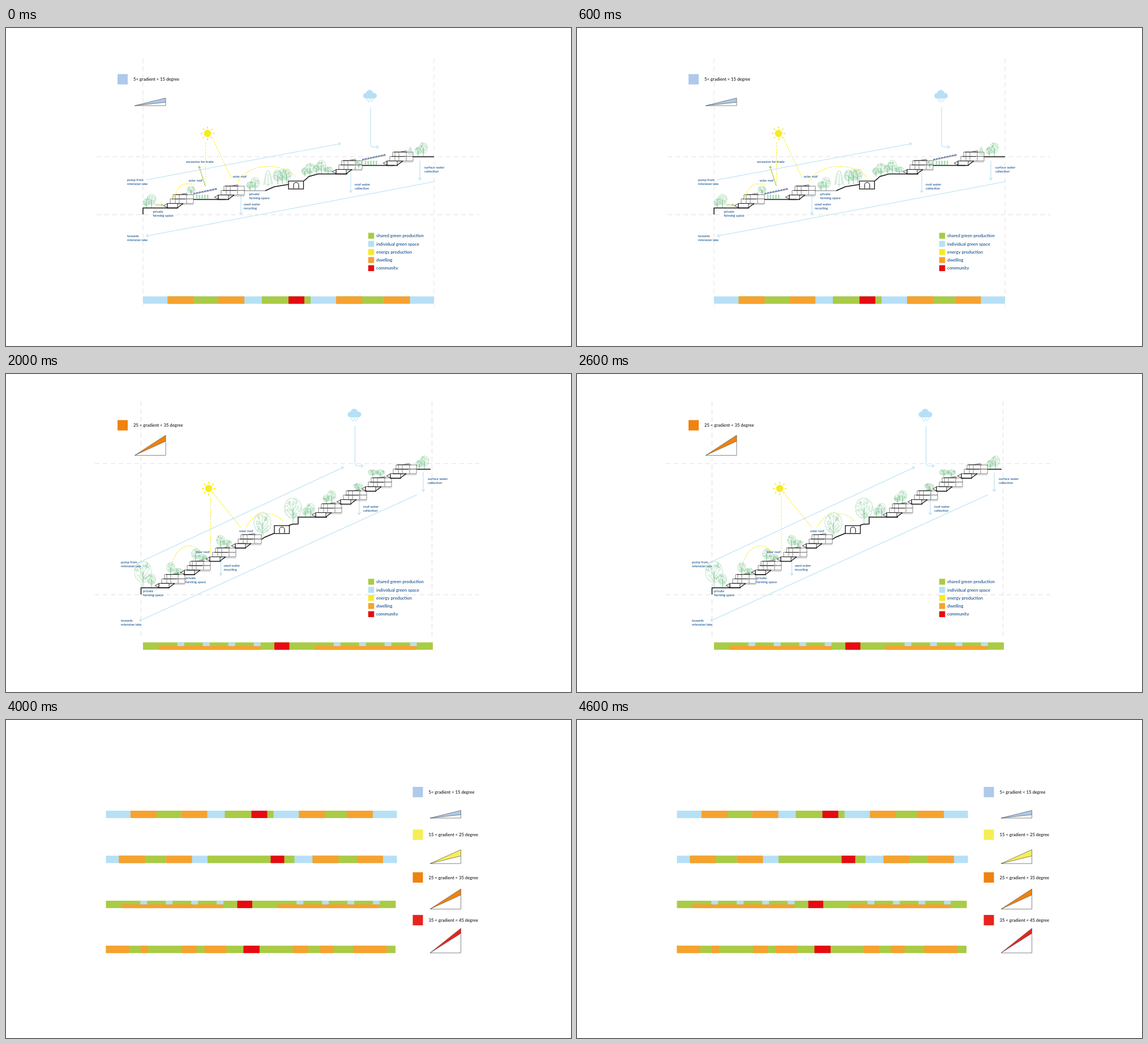
An HTML page with a canvas for the animation above (5000 ms loop, 998x561 px).

```html
<!DOCTYPE html>
<html lang="en">
<head>
<meta charset="utf-8">
<title>Hillside sections</title>
<style>
html, body { margin: 0; width: 100%; height: 100%; overflow: hidden; background: #fff; }
canvas { display: block; }
</style>
</head>
<body>
<canvas id="stage" width="998" height="561"></canvas>
<script>
const g = document.getElementById('stage').getContext('2d');
const INK = '#111', GREY = '#666', LEAF = '#84c997', SKY = '#b6e0f6', SUN = '#f7ea25', NAVY = '#0d4a8a', OLIVE = '#a3c644';
const ORANGE = '#f6a22f', GREEN = '#a9cb45', RED = '#e70a12';

let seed = 1;
const rnd = () => (seed = seed * 16807 % 2147483647) / 2147483647;

// Basic marks
function path(color, width, pts, close) {
  g.strokeStyle = color;
  g.lineWidth = width;
  g.beginPath();
  for (let i = 0; i < pts.length; i += 2) g.lineTo(pts[i], pts[i + 1]);
  if (close) g.closePath();
  g.stroke();
}
const ground = (...pts) => path(INK, 1.5, pts);
const thin = (...pts) => path(GREY, 0.9, pts);
function rect(color, x, y, w, h) {
  g.fillStyle = color;
  g.fillRect(x, y, w, h);
}
function box(color, width, x, y, w, h) {
  g.strokeStyle = color;
  g.lineWidth = width;
  g.strokeRect(x, y, w, h);
}
function dot(color, x, y, r) {
  g.fillStyle = color;
  g.beginPath();
  g.arc(x, y, r, 0, 7);
  g.fill();
}
function text(str, x, y, size, color) {
  g.font = `500 ${size}px Lato, "Open Sans", sans-serif`;
  g.fillStyle = color;
  str.split('|').forEach((line, i) => g.fillText(line, x, y + i * 6.9));
}
const label = (str, x, y) => text(str, x, y + 1.8, 5.9, NAVY);
function arrow(x1, y1, x2, y2, color = SKY, size = 4.5) {
  const angle = Math.atan2(y2 - y1, x2 - x1);
  const barb = a => [x2 - size * Math.cos(angle + a), y2 - size * Math.sin(angle + a)];
  path(color, 1.1, [x1, y1, x2, y2]);
  path(color, 1.1, [...barb(0.65), x2, y2, ...barb(-0.65)]);
}
function dashed(pattern, draw) {
  g.setLineDash(pattern);
  draw();
  g.setLineDash([]);
}
// Repeats a drawing along a slope
function row(draw, x, y, n, dx, dy, ...rest) {
  for (let i = 0; i < n; i++) draw(x + i * dx, y + i * dy, ...rest);
}

// Sun and water
function sun(x, y, nearX, nearY, farX, farY) {
  dot(SUN, x, y, 6.5);
  for (let i = 0; i < 8; i++) {
    const c = Math.cos(i * Math.PI / 4), s = Math.sin(i * Math.PI / 4);
    path(SUN, 1.8, [x + 8.6 * c, y + 8.6 * s, x + 12 * c, y + 12 * s]);
  }
  dashed([2.2, 2], () => {
    path(SUN, 1.3, [nearX, y + 16, nearX, nearY]);
    path(SUN, 1.3, [x + 10, y + 11, farX, farY]);
  });
}
function beam(x1, y1, topX, topY, x2, y2) {
  const k = 0.45;
  dashed([2.2, 2], () => {
    g.strokeStyle = SUN;
    g.lineWidth = 1.3;
    g.beginPath();
    g.moveTo(x1, y1);
    g.bezierCurveTo(x1 + (topX - x1) * 0.15, topY + (y1 - topY) * k, topX + (x1 - topX) * k, topY, topX, topY);
    g.bezierCurveTo(topX + (x2 - topX) * k, topY, x2 + (topX - x2) * 0.25, topY + (y2 - topY) * k, x2, y2);
    g.stroke();
  });
}
function rain(x, y) {
  const end = y + 91.5, cx = x - 1;
  dot(SKY, cx - 7, y + 1, 5);
  dot(SKY, cx - 0.5, y - 3, 6.2);
  dot(SKY, cx + 7, y + 1, 5);
  rect(SKY, cx - 7, y - 1, 14, 7);
  for (let i = 0; i < 5; i++) {
    const dx = cx - 5 + i * 2.5, dy = y + 8.5 + i % 2 * 3;
    path(SKY, 1.5, [dx + 0.6, dy - 1.2, dx - 0.6, dy + 1.2]);
  }
  g.lineWidth = 1.1;
  g.beginPath();
  g.moveTo(x, y + 21);
  g.lineTo(x, end - 5);
  g.quadraticCurveTo(x, end, x + 5, end);
  g.stroke();
  arrow(x + 5, end, x + 14, end);
}
function pump(x1, y1, x2, y2, labelX) {
  arrow(x1, y1, x2, y2);
  label('pump from|retension lake', labelX, y1);
}
function outflow(x1, y1, x2, y2, labelX) {
  arrow(x1, y1, x2, y2);
  label('towards|retension lake', labelX, y2);
}
function drain(kind, x, y, length, dx, dy) {
  arrow(x, y, x, y + length);
  label(kind, x + dx, y + dy);
}
const roofDrain = (x, y) => drain('roof water|collection', x, y, 39, 7, 24.8);
const surfaceDrain = (x, y) => drain('surface water|collection', x, y, 34, 8, 12);
const usedDrain = (x, y, length) => drain('used water|recycling', x, y, length, 5, length / 2);

// Planting
function tree(x, base, w, h) {
  const ry = h * 0.4, rx = w / 2, cy = base - h + ry, n = Math.round(9 + w / 3);
  const spot = (a, k) => [x + rx * k * Math.cos(a), cy + ry * k * Math.sin(a)];
  g.strokeStyle = LEAF;
  g.lineWidth = 0.55;
  g.beginPath();
  g.moveTo(...spot(0, 0.9));
  for (let i = 1; i <= n; i++) {
    const a = i / n * 2 * Math.PI;
    g.quadraticCurveTo(...spot(a - Math.PI / n, 1.12), ...spot(a, 0.84 + 0.1 * rnd()));
  }
  for (let i = 0; i < n; i++) {
    const [px, py] = spot(rnd() * 6.28, 0.45 + 0.4 * rnd()), a = rnd() * 6, r = w / 14 + 0.3;
    g.moveTo(px + r * Math.cos(a), py + r * Math.sin(a));
    g.arc(px, py, r, a, a + 4);
  }
  for (let i = 0; i < 7; i++) {
    g.moveTo(x, cy + ry * (0.9 - i % 3 * 0.3));
    g.lineTo(...spot(Math.PI * (0.1 - i * 0.2), 0.75));
  }
  for (const d of [-w / 45, w / 45]) {
    g.moveTo(x + d, cy);
    g.lineTo(x + d * 1.6, base);
  }
  g.stroke();
}
const bigTree = (x, base) => tree(x, base, 31, 47);
const bush = (x, base) => tree(x, base, 17, 12);
function grove(x, base) {
  tree(x, base, 12, 16);
  tree(x + 9, base, 16, 24);
}
function fir(x, base, w, h) {
  const n = 8, at = i => [w / 2 * Math.sqrt(i / n), base - h + h * 0.85 * i / n];
  for (const side of [-1, 1]) {
    const pts = [x, base - h];
    for (let i = 1; i <= n; i++) {
      const [r, y] = at(i);
      pts.push(x + side * r, y, x + side * r * 0.55, y - 0.6);
    }
    path(LEAF, 0.5, [...pts, x, base - h * 0.13]);
  }
  path(LEAF, 0.6, [x, base - h * 0.8, x, base]);
}
function crop(x, base, h, w) {
  path(LEAF, 0.8, [x, base, x, base - h]);
  for (let y = base - 1; y > base - h; y -= w > 6 ? 3.1 : 1.8)
    path(LEAF, 0.8, [x - w / 2, y - 0.7, x, y, x + w / 2, y - 0.7]);
}

// Buildings
function house(x, y) {
  path(INK, 0.8, [x + 8, y - 7.5, x + 1, y - 4, x + 8, y - 0.8], true);
  box(INK, 0.8, x + 8, y - 8, 18, 8);
  box(GREY, 0.8, x + 13, y - 16, 41, 8);
  box(GREY, 0.8, x + 18, y - 23.5, 36, 7.5);
  for (let i = 1; i < 4; i++) path(INK, 0.9, [x + 8 + i * 4, y - i * 7.9, x + 32 + i * 4, y - i * 7.9]);
  for (const d of [22, 29, 42]) path(GREY, 0.8, [x + d, y - 23, x + d, y - 8]);
  thin(x + 30, y - 23.8, x + 43, y - 26.2);
  path(GREY, 0.5, [x + 26, y - 6, x + 54, y - 6]);
  path(INK, 1.2, [x + 26, y - 0.5, x + 36, y - 8]);
  ground(x + 7, y, x + 27, y);
}
function windowAt(x, y) {
  box(INK, 1.1, x, y, 5.5, 5.5);
  thin(x + 2.75, y, x + 2.75, y + 5.5);
}
function tower(x, y) {
  const floor = (px, py, w) => box(INK, 0.9, px, py, w, 8);
  floor(x, y - 8, 24);
  row(floor, x + 12, y - 16, 3, 0, -8, 25);
  floor(x + 23, y - 40, 14);
  row(floor, x + 50, y - 41, 4, 0, -8, 19);
  path(GREY, 0.7, [x + 37, y - 21, x + 37, y - 50, x + 50, y - 50, x + 50, y - 21], true);
  path(GREY, 0.7, [x + 61, y - 65, x + 61, y - 76, x + 86, y - 76, x + 86, y - 58, x + 74, y - 58, x + 74, y - 65], true);
  row(windowAt, x + 41, y - 47, 3, 0, 8);
  row(windowAt, x + 63, y - 74, 2, 15, 0);
  windowAt(x + 78, y - 66);
  ground(x, y, x + 24, y, x + 24, y - 8, x + 37, y - 8);
  path(INK, 0.9, [x + 37, y - 15, x + 48, y - 15, x + 48, y - 21]);
}
function hall(x, y) {
  box(INK, 1.3, x, y - 14, 26.5, 14);
  g.lineWidth = 1.1;
  g.beginPath();
  g.moveTo(x + 9, y - 1);
  g.arc(x + 13.5, y - 7, 4.5, Math.PI, 0);
  g.lineTo(x + 18, y - 1);
  g.stroke();
}
function solar(x1, y1, x2, y2) {
  path(GREY, 0.8, [x1, y1, x2, y2]);
  dashed([3.6, 1.2], () => path('#4f68ad', 1.5, [x1, y1 - 1.5, x2, y2 - 1.5]));
}
function greenhouse(x, y) {
  thin(x, y, x, y + 31, x + 79, y + 31, x + 79, y - 34);
  solar(x, y, x + 79, y - 33);
  for (let i = 0; i < 6; i++) {
    const px = x + i * 13.2, py = y + 26.5 - i * 3.5;
    ground(px, py, px + 13.2, py, px + 13.2, py - 3.5);
    crop(px + 6.5, py - 1, 27 + i * 1.2, 11);
  }
}

// Gradient keys and land-use bars
const KEYS = [
  ['5< gradient < 15 degree', '#aec9ea', 13.5, 6],
  ['15 < gradient < 25 degree', '#f6ee56', 24.5, 13.5],
  ['25 < gradient < 35 degree', '#f0820f', 35.5, 25],
  ['35 < gradient < 45 degree', '#e8231c', 43.5, 34.5]
];
function key(i, x, y, base) {
  const [name, color, rise, low] = KEYS[i], l = x + 30.5, r = x + 85;
  rect(color, x, y, 18, 18.3);
  text(name, x + 28, y + 12, 7.7, INK);
  g.fillStyle = color;
  g.beginPath();
  g.moveTo(l, base);
  g.lineTo(r, base - rise);
  g.lineTo(r, base - low);
  g.fill();
  path('#555', 0.7, [l, base, r, base - rise, r, base], true);
  path('#555', 0.7, [l, base, r, base - low]);
}

function villageBar(put, homes, garden, hallSpan) {
  put(SKY, 242, 756);
  for (const i of [0, 2]) put(GREEN, homes[i], homes[i + 1]);
  for (const x of homes) put(ORANGE, x, x + 46);
  put(GREEN, ...garden);
  put(RED, ...hallSpan);
}
const BARS = [
  put => villageBar(put, [285.5, 375, 583, 667.5], [452, 538], [499, 527]),
  put => villageBar(put, [265, 348, 607, 685.5], [421.5, 575], [533, 557]),
  put => {
    put(GREEN, 242, 754);
    for (const x of [269.5, 545.5]) {
      put(ORANGE, x, x + 180, 6.5);
      row(px => put(SKY, px, px + 12, 0, 6.5), x + 33.2, 0, 4, 45, 0);
    }
    put(RED, 474, 500.5);
  },
  put => {
    put(GREEN, 247, 723);
    for (const [a, b] of [[247, 285], [304, 316], [372, 396], [409, 445], [554, 579.5], [599, 621], [653.5, 708.5]]) put(ORANGE, a, b);
    put(RED, 473, 499.5);
  }
];
function bar(i, y, shift = 0, k = 1) {
  const at = x => 242 + shift + (x - 242) * k;
  BARS[i]((color, a, b, top = 0, h = 13 - top) => rect(color, at(a), y + top, at(b) - at(a), h));
}
function legend() {
  const rows = { 'shared green production': GREEN, 'individual green space': SKY, 'energy production': SUN, dwelling: ORANGE, community: RED };
  Object.entries(rows).forEach(([name, color], i) => {
    const y = 361.3 + i * 14.3;
    rect(color, 639.8, y, 10.4, 10.4);
    text(name, 654, y + 7.9, 7.8, NAVY);
  });
}
function page(left, top, bottom, x1, x2, y1, y2) {
  dashed([8, 6], () => {
    for (const x of [left, left + 514]) path('#dcdcdc', 0.9, [x, top, x, bottom]);
    for (const y of [y1, y2]) path('#dcdcdc', 0.9, [x1, y, x2, y]);
  });
}

// The four slopes
function gentle() {
  page(242, 54, 491, 160, 836, 227, 329.5);
  pump(247, 268, 591, 204, 214);
  outflow(757, 271, 248, 367, 214);
  rain(644, 118.5);
  roofDrain(609, 251);
  surfaceDrain(731, 234);
  usedDrain(415, 294, 35);
  sun(356, 186, 352.5, 278, 398, 265);

  grove(248, 317);
  tree(327, 295, 15, 16);
  grove(431, 287);
  fir(463, 280, 17, 29);
  row(tree, 480, 276, 3, 8, -1, 16, 26);
  grove(528, 262);
  grove(548, 257);
  bush(569, 257);
  tree(623, 247, 10, 13);
  fir(714, 225, 7, 15);
  grove(728, 226);

  thin(420, 287, 458, 287);
  ground(242, 329, 242, 317.5, 303, 317.5);
  ground(458, 287, 474, 280, 499, 276);
  ground(526, 270, 535, 262, 551, 257.5, 603, 257.5);
  ground(718, 227.2, 756, 227.2);
  for (const [x, y] of [[277, 317.5], [575, 257.5]]) {
    row(house, x, y, 2, 90, -15);
    ground(x + 54, y - 15, x + 111, y - 15);
    solar(x + 54, y - 24, x + 96, y - 33);
    row(crop, x + 60, y - 15.5, 5, 4.8, 0, 8, 3);
  }
  hall(499, 284);

  beam(296, 303, 318, 275, 333, 276);
  beam(410, 270, 464, 244, 512, 262);
  arrow(352, 279, 341, 244, OLIVE, 3.5);
  arrow(263, 312, 277, 312, OLIVE, 3.5);
  label('excessive for trade', 318, 236);
  label('solar roof', 322.5, 269.5);
  label('solar roof', 400.5, 262);
  label('private|farming space', 259.5, 324);
  label('private|farming space', 429.5, 293);
}
function moderate() {
  page(241.5, 45, 490, 159, 850, 228, 356);
  pump(246, 284, 591, 204, 214.5);
  outflow(757, 271, 247, 381, 214.5);
  rain(622, 118.5);
  roofDrain(629.5, 251);
  surfaceDrain(742, 234);
  usedDrain(380, 323, 25);
  sun(379.5, 188, 376.5, 273, 421, 265);

  grove(247, 343);
  bigTree(319, 328);
  fir(340, 328, 20, 34);
  grove(401, 313);
  row(tree, 506, 286, 2, 9, -4, 17, 28);
  grove(569, 259);
  bush(588, 258);
  bigTree(657, 244);
  fir(679, 243, 16, 33);
  grove(733, 229);

  thin(318, 329, 368, 329);
  thin(394, 314, 420, 314);
  ground(241.5, 356, 241.5, 344, 290, 344);
  ground(499, 291, 514, 283, 531, 276);
  ground(557, 270, 563, 262, 578, 259, 637, 259);
  ground(653, 244, 706, 244);
  ground(730, 228.5, 756, 228.5);
  row(house, 264, 344, 2, 76, -15);
  row(house, 600, 259, 2, 76, -15);
  greenhouse(420, 283);
  hall(531, 285);

  beam(320, 303, 350, 276, 369, 280);
  beam(453, 261, 500, 231, 545, 263);
  arrow(450, 262, 439, 228, OLIVE, 3.5);
  arrow(256, 341, 269, 341, OLIVE, 3.5);
  arrow(404, 310, 391, 310, OLIVE, 3.5);
  label('excessive for trade', 416.5, 220);
  label('solar roof', 346, 271.5);
  label('solar roof', 424.5, 263.5);
  label('private|farming space', 254, 352.5);
  label('private|farming space', 390, 284.5);
}
function steep() {
  page(238.5, 48, 462, 157, 836, 158, 389.5);
  pump(236, 332, 596, 164.5, 203);
  outflow(726, 213, 236, 435.5, 203);
  rain(616.5, 70.5);
  roofDrain(624, 209);
  surfaceDrain(737, 173);
  usedDrain(379.5, 321, 34);
  sun(358, 202, 361, 318, 414, 270);

  bigTree(242, 377);
  tree(257, 377, 15, 25);
  row(tree, 291, 355, 3, 44, -24, 15, 23);
  row(bush, 304, 355, 3, 43, -25);
  bigTree(453, 291);
  bigTree(507, 265);
  grove(529, 252);
  grove(566, 229);
  bush(622, 205);
  row(bush, 648, 181, 2, 13, 0);
  grove(730, 168);

  ground(238.5, 389, 238.5, 377.3, 289, 377.3);
  ground(451, 292, 457, 288, 474, 281);
  ground(500, 267, 506, 265, 516, 264.5, 516, 252.5, 567, 252.5);
  ground(725, 168, 750, 168);
  row(house, 262, 377.3, 4, 45, -23.4);
  row(house, 539, 252.5, 4, 44, -22.9);
  hall(474, 281.5);

  beam(294, 332, 324, 303, 345, 315);
  beam(425, 270, 458, 246, 491, 260);
  label('solar roof', 335, 314.5);
  label('solar roof', 412, 277);
  label('private|farming space', 242, 383.5);
  label('private|farming space', 317, 360);
}
function cliff() {
  page(248, 50, 535, 166, 858, 116.5, 450.5);
  pump(248, 385, 569, 170.5, 199);
  outflow(724, 182, 250, 499.5, 199);
  rain(620.5, 69.5);
  roofDrain(601, 207);
  surfaceDrain(733, 141);
  usedDrain(391, 359, 37);
  sun(334, 241.5, 337, 355, 394, 320);

  row(grove, 290, 431, 2, 111, -68);
  grove(451, 311);
  row(tree, 504, 286, 2, 11.5, -18, 19, 30);
  grove(528, 259);
  row(tree, 583, 238, 2, 108, -80, 23, 35);
  tree(727, 130, 26, 31);
  tree(744, 130, 14, 23);

  thin(446, 306, 446, 317);
  ground(446, 317, 499, 317, 499, 292, 528, 259.5);
  ground(528, 258.5, 566, 258.5);
  ground(446, 306, 499, 306);
  for (const [x, y] of [[248, 451], [542, 258]]) {
    row(tower, x, y, 2, 111.3, -70);
    thin(x + 69, y - 42, x + 111, y - 70);
    solar(x + 68, y - 65, x + 116, y - 98);
    row(crop, x + 74, y - 47, 4, 10.7, -6.8, 21, 5);
  }
  hall(473, 306);

  beam(267, 412, 302, 354, 327, 357);
  beam(399, 320, 450, 275, 484, 288);
  arrow(327, 413, 309, 413, OLIVE, 3.5);
  arrow(359, 377, 373, 377, OLIVE, 3.5);
  label('solar roof', 315.5, 363.5);
  label('solar roof', 383.5, 325.5);
  label('shared|farming space', 337, 399.5);
  label('shared|farming space', 449.5, 323.5);
}
function summary() {
  KEYS.forEach(([, , rise], i) => {
    key(i, 718.5, 118 + i * 75.3, 159.5 + i * 69.3 + rise);
    bar(i, 160 + i * 79.4, i === 3 ? -65.5 - 5.3 : -65.5, i === 3 ? 1.0745 : 1);
  });
}

const SLOPES = [gentle, moderate, steep, cliff];
let shown = -1;
function frame(now) {
  const i = Math.floor(now % 5000 / 1000);
  if (i !== shown) {
    shown = i;
    seed = 11 + i;
    rect('#fff', 0, 0, 998, 561);
    if (i < 4) {
      SLOPES[i]();
      key(i, 197, 81.3, 137 + [0, 0.5, 6.5, 13.5][i]);
      bar(i, 473.5);
      legend();
    } else summary();
  }
  requestAnimationFrame(frame);
}
frame(0);
</script>
</body>
</html>
```
